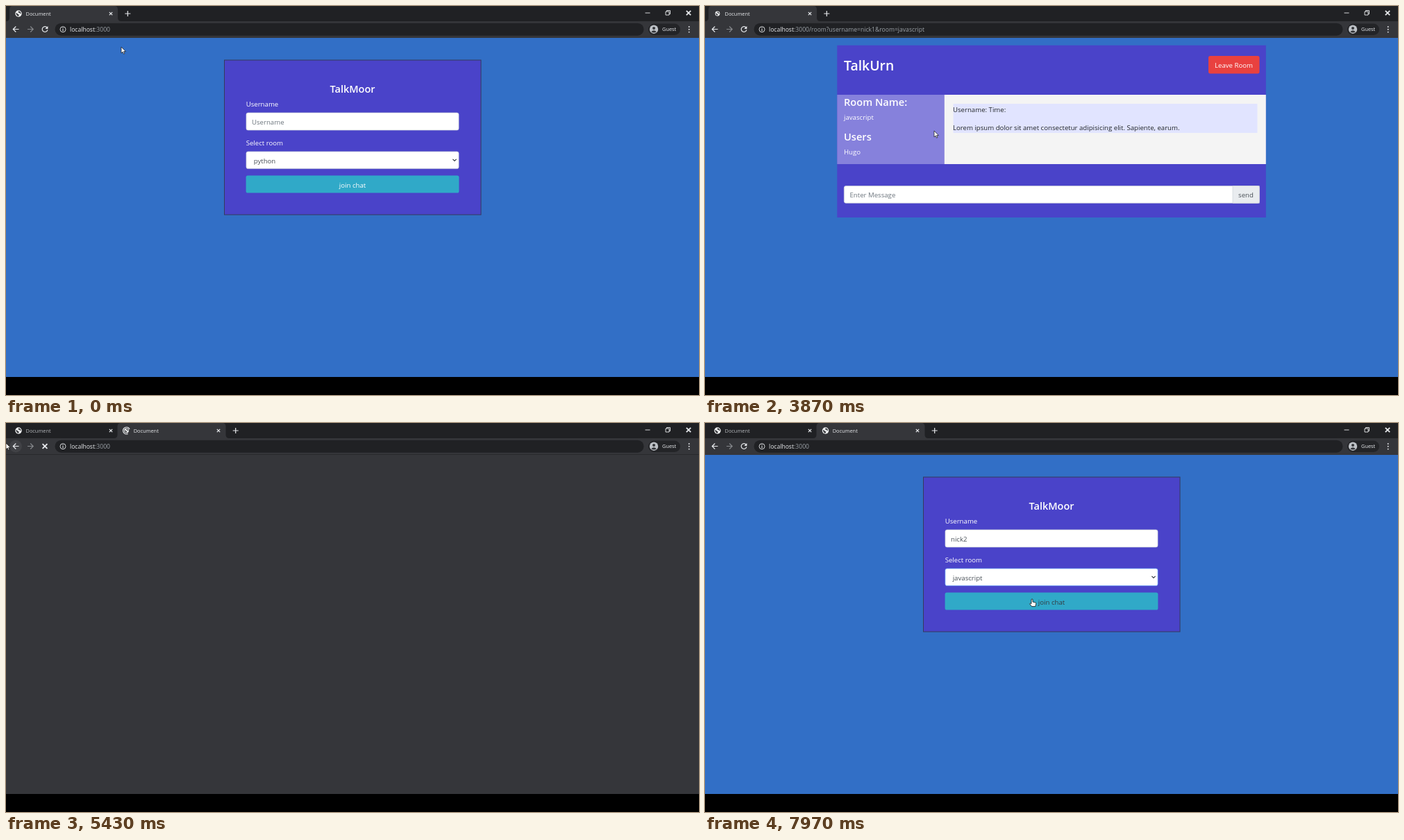
An HTML page for the animation above (8 s loop, 998 by 561 pixels).

```html
<!DOCTYPE html>
<html lang="en">
<head>
<meta charset="utf-8">
<title>Chat rooms</title>
<style>
html, body { margin: 0; width: 100%; height: 100%; overflow: hidden; background: #000; }
svg { display: block; width: 998px; height: 561px; }
text { font: 9.65px "Open Sans", "Noto Sans", sans-serif; fill: #fff; white-space: pre; }
.ui text, text.ui { font-size: 7.4px; fill: #e8eaed; }
.ui .url { font-size: 8.6px; }
.ui .dim { fill: #9aa0a6; }
.mid { text-anchor: middle; }
text.h { font-weight: 600; font-size: 14.6px; }
text.big { font-size: 19.4px; }
.dark text { fill: #212529; }
text.hint { fill: #6c757d; }
text.value { fill: #495057; }
.line { fill: none; stroke: #e8eaed; stroke-width: 1.2; }
.field { fill: #fff; stroke: #ced4da; stroke-width: .7; }
.field.focus { stroke: #80bdff; }
</style>
</head>
<body>
<svg viewBox="0 0 998 561">
  <defs>
    <path id="tabShape" d="M0 22q5 0 5-5V5q0-5 5-5H156q5 0 5 5V17q0 5 5 5Z" fill="#35363a"/>
    <g id="globe">
      <circle r="4.7" fill="#f1f3f4"/>
      <path d="M-3.6-1.2Q-1.5-.8-1 .8L.8 1.4Q.9 3-.7 3.8-3.4 2.6-3.6-1.2ZM.2-3.7Q3-3.2 3.7-.4L2.3.2 1.6-1.3-.5-1.5Z" fill="#35363a"/>
    </g>
    <path id="cross" class="line" d="M-2.2-2.2 2.2 2.2M2.2-2.2-2.2 2.2"/>
  </defs>

  <rect width="998" height="535" fill="#326fc6"/>

  <g id="form">
    <rect x="314.5" y="78" width="369.5" height="223" fill="#4a43c9" stroke="#343a5c"/>
    <text class="h mid" x="499" y="124.5" style="font-size:14.5px">TalkMoor</text>
    <text x="345.7" y="145">Username</text>
    <rect id="nameBox" class="field" x="346" y="154" width="306" height="25" rx="2.6"/>
    <text id="name" x="354" y="171"></text>
    <rect id="caret" y="160" width=".9" height="13.5" fill="#333"/>
    <text x="345.7" y="201">Select room</text>
    <rect id="roomBox" class="field" x="346" y="210" width="306" height="24.6" rx="2.6"/>
    <text id="room" class="value" x="356.7" y="227"></text>
    <path d="M643.4 220.9l2.6 2.6 2.6-2.6" fill="none" stroke="#343a40" stroke-width="1.2"/>
    <rect x="345.6" y="244.6" width="306.8" height="25" rx="2.6" fill="#30a9c8"/>
    <text id="join" class="mid" x="499" y="261.5">join chat</text>
  </g>

  <g id="chat">
    <rect id="panel" x="190.3" y="56.7" width="617.5" fill="#4a43c9"/>
    <text class="h big" x="200" y="93">TalkUrn</text>
    <rect x="725" y="72" width="73.5" height="25.4" rx="2.6" fill="#e9413f"/>
    <text class="mid" x="761.5" y="89">Leave Room</text>
    <rect id="side" x="190.3" y="128" width="154.4" fill="#8681dc"/>
    <rect id="main" x="344.7" y="128" width="463.1" fill="#f4f4f4"/>
    <text class="h" x="200" y="144">Room Name:</text>
    <text x="200" y="164.3">javascript</text>
    <text class="h" x="200" y="194">Users</text>
    <text id="member" x="200" y="214"></text>
    <g class="dark">
      <rect x="357.5" y="141" width="438" height="42" fill="#e1e4ff"/>
      <text x="357" y="153.3">Username: Time:</text>
      <text x="357" y="179.3">Lorem ipsum dolor sit amet consectetur adipisicing elit. Sapiente, earum.</text>
    </g>
    <g id="bot" class="dark">
      <rect x="357.5" y="193.3" width="438" height="42" fill="#e1e4ff"/>
      <text x="357" y="205.3">Username: Bot Time: 5:40 pm</text>
      <text x="357" y="231.3">Welcome to chatbot</text>
    </g>
    <g id="entry">
      <rect class="field" x="200.3" y="259.6" width="598" height="24.6" rx="2.6"/>
      <path d="M760 259.6H798.3V284.2H760Z" fill="#e9ecef" stroke="#ced4da" stroke-width=".7"/>
      <text class="hint" x="208.5" y="276">Enter Message</text>
      <text class="mid value" x="779" y="276">send</text>
    </g>
  </g>

  <g id="blank">
    <rect y="45" width="998" height="490" fill="#35363a"/>
  </g>

  <g class="ui">
    <rect width="998" height="22" fill="#202124"/>
    <rect y="22" width="998" height="24" fill="#35363a"/>
    <rect id="rule" y="45" width="998" height="1" fill="#28292c"/>
    <use id="activeTab" href="#tabShape"/>
    <use id="icon1" href="#globe"/>
    <text id="title1" x="28.5" y="13.7">Document</text>
    <use href="#cross" x="151" y="11"/>
    <g id="tab2">
      <use id="icon2" href="#globe"/>
      <text id="title2" x="183.7" y="13.7"></text>
      <use href="#cross" x="306" y="11"/>
    </g>
    <path id="spinner" d="M0-5A5 5 0 1 1-5 0" class="line"/>
    <g id="plus">
      <circle id="plusGlow" r="9.2" fill="#515256"/>
      <path class="line" d="M-4 0H4M0-4V4"/>
    </g>
    <path class="line" stroke-width="1" d="M920.5 10H927.5M950 8H955V13H950ZM951.5 8V6.5H956.5V11.5H955" style="stroke-width:.9"/>
    <use href="#cross" transform="translate(983 10) scale(1.45)" style="stroke-width:.7"/>
    <circle id="backGlow" cx="14" cy="33.5" r="9" fill="#414246"/>
    <path class="line" d="M18.5 33.5H10.5M14.3 29.5L10.3 33.5 14.3 37.5"/>
    <path class="line" d="M31 33.5H39M35.2 29.5L39.2 33.5 35.2 37.5" style="stroke:#85888c"/>
    <g id="reload">
      <path class="line" d="M59.2 31.2A3.9 3.9 0 1 0 59.9 34.4"/>
      <path d="M60.4 29V33H56.4Z" fill="#e8eaed"/>
    </g>
    <use id="stop" href="#cross" transform="translate(56 33.5) scale(1.55)"/>
    <rect x="70.5" y="24.7" width="848" height="18" rx="9" fill="#202124"/>
    <circle class="line" cx="82" cy="33.7" r="4" style="stroke-width:.9"/>
    <path class="line" d="M82 33.2V36M82 31.2V32.2"/>
    <text class="url" x="92" y="37.1"><tspan id="host"></tspan><tspan id="path" class="dim"></tspan></text>
    <rect x="925" y="25.5" width="46" height="16.5" rx="8.2" fill="#232427"/>
    <circle cx="933" cy="33.7" r="6.2" fill="#bdc1c6"/>
    <circle cx="933" cy="31.9" r="2" fill="#35363a"/>
    <path d="M929.2 37.2Q933 33.2 936.8 37.2 933 40 929.2 37.2Z" fill="#35363a"/>
    <text x="945" y="36.4">Guest</text>
    <path d="M983.7 30V38" stroke="#e8eaed" stroke-width="1.9" stroke-linecap="round" stroke-dasharray="0 3.8"/>
  </g>

  <rect y="535" width="998" height="26"/>

  <g id="pointer">
    <path id="arrow" d="M0 0V9L2.1 7.1 3.5 10.2 4.9 9.6 3.6 6.6H6.4Z" fill="#fff" stroke="#111" stroke-width=".7"/>
    <path id="hand" d="M-1 .4Q0-.6 1 .4V4L5 5Q6 5.3 5.7 6.6L4.8 10.6H-.4L-3.4 6.8Q-3.3 5.3-1 6.5Z" fill="#fff" stroke="#111" stroke-width=".8"/>
    <path id="beam" d="M-1.7-4H1.7M0-4V4M-1.7 4H1.7" fill="none" stroke="#333" stroke-width=".8"/>
  </g>
</svg>
<script>
const LOOP = 8000;
const $ = id => document.getElementById(id);
const show = (id, on) => $(id).style.display = on ? "" : "none";
const set = (id, attrs) => Object.entries(attrs).forEach(([k, v]) => $(id).setAttribute(k, v));
const put = (id, text) => { if ($(id).textContent !== text) $(id).textContent = text; };
const within = (v, a, b) => v >= a && v < b;

// time, x, y of the pointer's hot spot
const route = [
  [30, 166, 59], [650, 420, 168], [1000, 420, 168], [1300, 400, 316], [2050, 400, 316],
  [2450, 399, 263], [3480, 399, 263], [3870, 330, 180], [4250, 290, 130], [4700, 177, 1],
  [4900, 177, 1], [5330, 0, 29], [5480, 0, 29], [6130, 477, 175], [6700, 477, 175],
  [7000, 490, 200], [7250, 490, 200], [7560, 471, 254]
];
// when each visit to the form gets its input
const visits = [
  { user: "nick1", focus: 700, type: 920, tab: 1650, pick: 1800 },
  { user: "nick2", focus: 6140, type: 6300, tab: 6800, pick: 6950 }
];
const OPEN_CHAT = 3750, GREET = 3910, NEW_TAB = 4850, TYPE_URL = 5070, GO = 5290, OPEN_FORM = 5560;

function pointerAt(t) {
  const i = route.findIndex(p => p[0] > t);
  if (i === 0) return route[0].slice(1);
  if (i < 0) return route[route.length - 1].slice(1);
  const [t0, x0, y0] = route[i - 1], [t1, x1, y1] = route[i];
  const u = (t - t0) / (t1 - t0), e = u * u * (3 - 2 * u);
  return [x0 + (x1 - x0) * e, y0 + (y1 - y0) * e];
}

function drawForm(t, overButton) {
  const v = visits[t < NEW_TAB ? 0 : 1];
  const typed = v.user.slice(0, Math.max(0, Math.ceil((t - v.type) / 80)));
  const nameFocus = within(t, v.focus, v.tab);
  put("name", typed || "Username");
  $("name").setAttribute("class", typed ? "value" : "hint");
  $("nameBox").classList.toggle("focus", nameFocus);
  $("roomBox").classList.toggle("focus", t >= v.tab);
  put("room", t < v.pick ? "python" : "javascript");
  const since = t - (typed ? v.type + 400 : v.focus);
  show("caret", nameFocus && (since < 0 || since % 1060 < 530));
  set("caret", { x: 354 + (typed ? $("name").getComputedTextLength() + .5 : 0) });
  $("join").style.fill = overButton ? "#343a40" : "#fff";
}

function drawChat(t) {
  const greeted = t >= GREET, grow = greeted ? 19.7 : 0;
  show("bot", greeted);
  put("member", greeted ? "nick1" : "Hugo");
  set("panel", { height: 248.3 + grow });
  set("side", { height: 100 + grow });
  set("main", { height: 100 + grow });
  set("entry", { transform: `translate(0 ${grow})` });
}

function drawBrowser(t, x, y) {
  const second = t >= NEW_TAB;
  const loading = within(t, 3480, OPEN_CHAT) || within(t, GO, OPEN_FORM);
  const iconScale = (id, cx, busy) => set(id, { transform: `translate(${cx} 11) scale(${busy ? .72 : 1})` });
  iconScale("icon1", 18, within(t, 3480, GREET));
  iconScale("icon2", 173.5, loading);
  show("tab2", second);
  show("icon2", t >= GO);
  show("rule", second && t < OPEN_FORM);
  put("title2", t < GO ? "New Tab" : "Document");
  $("title1").style.fill = second ? "#b4b7bb" : "";
  set("activeTab", { x: second ? 155.5 : 0 });
  set("plus", { transform: `translate(${second ? 330.7 : 175.3} 11)` });
  show("plusGlow", !second && y < 20 && Math.abs(x - 175) < 10);
  show("backGlow", x < 24 && within(y, 22, 45));
  show("spinner", loading);
  set("spinner", { transform: `translate(${second ? 173.5 : 18} 11) rotate(${t * .36 % 360})` });
  show("reload", !loading);
  show("stop", loading);

  const address = "localhost:3000";
  const query = within(t, OPEN_CHAT, NEW_TAB) ? "/room?username=nick1&room=javascript" : "";
  const count = within(t, NEW_TAB, GO) ? Math.max(0, Math.ceil((t - TYPE_URL) / 15)) : address.length;
  const shown = address.slice(0, count);
  put("host", shown.slice(0, 9));
  put("path", shown.slice(9) + query);
}

function render(t) {
  const [x, y] = pointerAt(t);
  const onForm = t < OPEN_CHAT || t >= OPEN_FORM;
  const overX = onForm && within(x, 346, 652);
  const overButton = overX && within(y, 245, 270);
  const overName = overX && within(y, 154, 179);
  show("form", onForm);
  show("chat", within(t, OPEN_CHAT, NEW_TAB));
  show("blank", within(t, NEW_TAB, OPEN_FORM));
  if (onForm) drawForm(t, overButton);
  else drawChat(t);
  drawBrowser(t, x, y);
  set("pointer", { transform: `translate(${x} ${y})` });
  show("hand", overButton);
  show("beam", overName);
  show("arrow", !overButton && !overName);
}

const start = performance.now();
function tick() {
  render((performance.now() - start) % LOOP);
  requestAnimationFrame(tick);
}
tick();
</script>
</body>
</html>
```
